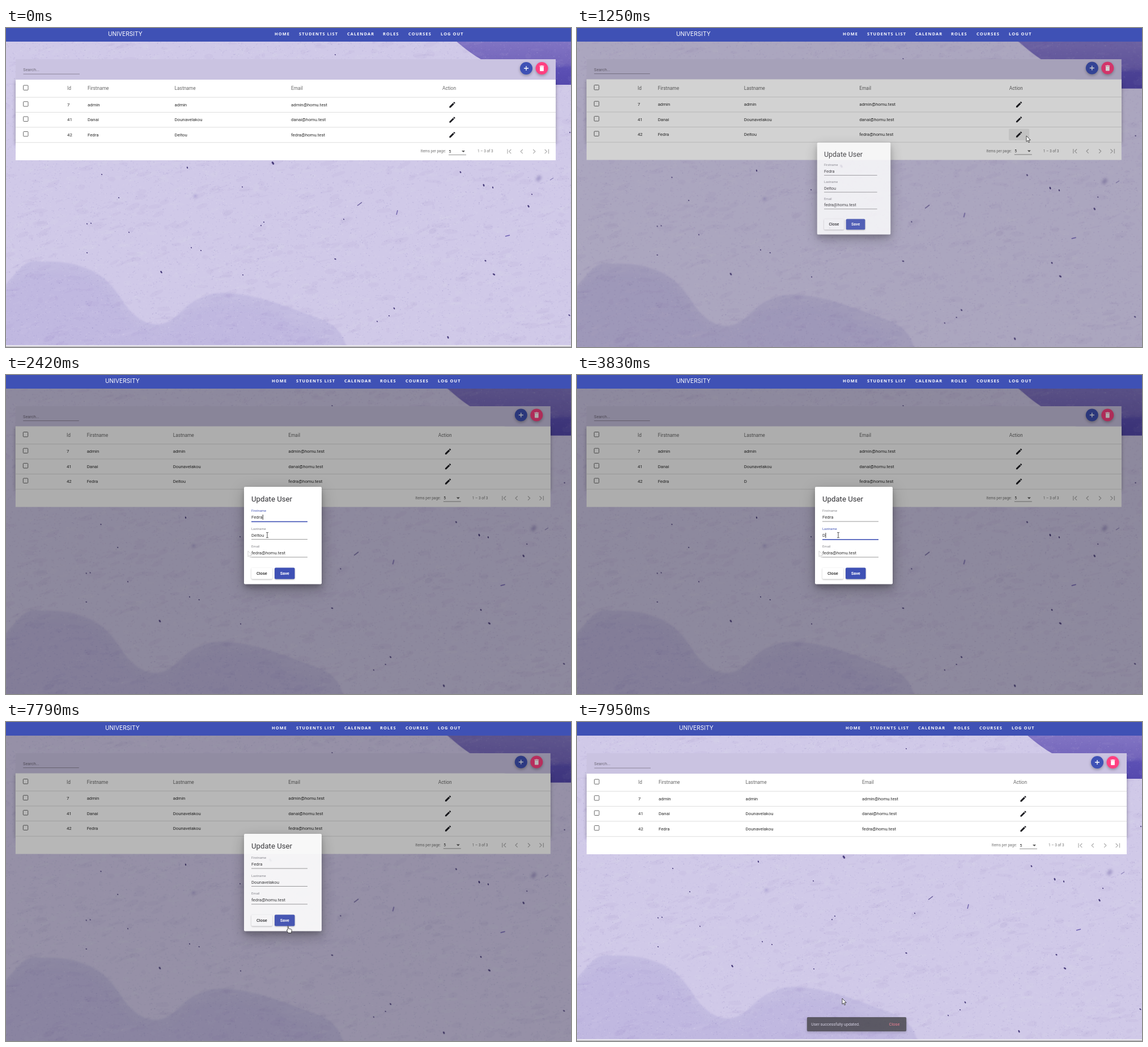
An HTML page with a canvas for the animation above (8000 ms loop, 997 by 562 pixels).

```html
<!DOCTYPE html>
<html lang="en">
<head>
<meta charset="utf-8">
<title>Update user</title>
<style>
html, body { margin: 0; width: 100%; height: 100%; overflow: hidden; background: #d0c9e6; }
canvas, svg { position: absolute; left: 0; top: 0; width: 100%; height: 100%; display: block; }
svg { overflow: hidden; }
text { font-family: Roboto, sans-serif; white-space: pre; }
.brand { font: 10.2px Inter, sans-serif; fill: #fff; }
.menu { font: 700 7.4px "Open Sans", sans-serif; letter-spacing: 1.1px; fill: #fff; }
.head { font-size: 8.4px; fill: #686868; }
.cell { font-size: 7.8px; fill: #2b2b2b; }
.hint { font-size: 7.4px; fill: #6f6a7a; }
.small { font-size: 6.5px; fill: #757575; }
.title { font-size: 13.2px; fill: #2f2f33; }
.label { font-size: 5.8px; fill: #85858a; }
.value { font-size: 7.8px; fill: #333; }
.btn { font-size: 7.4px; font-weight: 500; text-anchor: middle; }
.fab { filter: drop-shadow(0 2px 2.5px rgba(0,0,0,.3)); }
.raised { filter: drop-shadow(0 1px 1px rgba(0,0,0,.28)); }
.sheet { filter: drop-shadow(0 5px 5px rgba(0,0,0,.2)) drop-shadow(0 8px 12px rgba(0,0,0,.26)); }
.box { fill: none; stroke: #6a6a6a; stroke-width: 1; }
.arrows { fill: none; stroke: #adadad; stroke-width: 1.2; }
</style>
</head>
<body>
<canvas id="paper" width="997" height="562"></canvas>
<svg id="stage" viewBox="0 0 997 562"></svg>
<script>
const LOOP = 8000, BLUE = '#3f51b5', PINK = '#ff4081';
const KEYS = [3830, 3990, 4150, 4230, 5140, 5300, 5540, 5620, 5770, 6020, 6090, 6550];
const OLD_NAME = 'Deltou', NEW_NAME = 'Dounavelakou';
const USERS = [
  ['7', 'admin', 'admin', 'admin@homu.test'],
  ['41', 'Danai', NEW_NAME, 'danai@homu.test'],
  ['42', 'Fedra', OLD_NAME, 'fedra@homu.test'],
];

// ---- helpers ----
const clamp = (v) => Math.min(1, Math.max(0, v));
const $ = (id) => document.getElementById(id);
const set = (el, name, v) => el.setAttribute(name, v);
const show = (el, on) => set(el, 'visibility', on ? 'visible' : 'hidden');
const text = (cls, x, y, s, more = '') => `<text class="${cls}" x="${x}" y="${y}" ${more}>${s}</text>`;
const rect = (x, y, w, h, fill, more = '') =>
  `<rect x="${x}" y="${y}" width="${w}" height="${h}" fill="${fill}" ${more}/>`;

function bezier(x1, y1, x2, y2) {
  const at = (a, b, u) => 3 * a * u * (1 - u) ** 2 + 3 * b * u * u * (1 - u) + u ** 3;
  return (x) => {
    x = clamp(x);
    let lo = 0, hi = 1;
    for (let i = 0; i < 22; i++) {
      const mid = (lo + hi) / 2;
      if (at(x1, x2, mid) < x) lo = mid; else hi = mid;
    }
    return at(y1, y2, lo);
  };
}
const swift = bezier(.25, .8, .25, 1);
const decel = bezier(0, 0, .2, 1);

function random(seed) {
  return () => {
    seed = (seed * 1664525 + 1013904223) >>> 0;
    return seed / 4294967296;
  };
}

// ---- paper background ----
function makePaper() {
  const sheet = document.createElement('canvas'), W = 1012, H = 576;
  sheet.width = W;
  sheet.height = H;
  const c = sheet.getContext('2d'), rnd = random(11);
  c.fillStyle = '#d0c9e8';
  c.fillRect(0, 0, W, H);

  const blob = new Path2D('M0 452 C18 430 32 412 48 411 C84 411 110 412 132 420 C172 432 188 454 ' +
    '206 481 C224 508 245 522 267 522 C300 521 309 490 340 477 C362 466 382 464 412 469 ' +
    'C458 475 505 494 552 512 C584 522 599 544 604 576 H0Z');
  c.filter = 'blur(1px)';
  c.fillStyle = '#c3bce1';
  c.fill(blob);
  c.save();
  c.clip(blob);
  c.filter = 'blur(5px)';
  c.fillStyle = 'rgba(180,171,218,.2)';
  c.fill(new Path2D('M-10 470 C30 420 90 425 140 436 C180 448 190 490 225 520 C260 540 290 535 ' +
    '330 500 C380 478 460 488 510 520 C560 540 575 560 580 586 H-10Z'));
  c.restore();
  c.filter = 'none';

  const corner = c.createLinearGradient(0, 24, 0, 100);
  corner.addColorStop(0, '#8174c3');
  corner.addColorStop(.5, '#7466bb');
  corner.addColorStop(.62, '#5c50b4');
  corner.addColorStop(1, '#5549ae');
  c.fillStyle = corner;
  c.fill(new Path2D('M768 0 C795 24 815 42 838 55 C880 84 920 100 960 100 H1012 V0Z'));

  // fine mottling and grain
  for (let i = 0; i < 1800; i++) {
    c.fillStyle = rnd() < .5 ? 'rgba(255,255,255,.04)' : 'rgba(110,95,170,.035)';
    c.beginPath();
    c.ellipse(rnd() * W, rnd() * H, 2 + rnd() * 12, 1 + rnd() * 4, -.5 + rnd() * .6, 0, 7);
    c.fill();
  }
  for (let i = 0; i < 26000; i++) {
    const a = .03 + rnd() * .1;
    c.fillStyle = rnd() < .45 ? `rgba(255,255,255,${a * 1.2})` : `rgba(95,82,160,${a})`;
    c.fillRect(rnd() * W, rnd() * H, .8 + rnd() * 1.4, .7 + rnd() * .9);
  }
  for (let i = 0; i < 420; i++) {
    c.fillStyle = `rgba(85,72,150,${.12 + rnd() * .2})`;
    c.fillRect(rnd() * W, rnd() * H, .7 + rnd(), .7 + rnd() * .6);
  }

  // dark flecks: x, y, size
  const flecks = [471,238,4, 843,277,3, 859,281,2, 928,293,1, 922,314,3, 802,254,2, 846,410,2,
    861,434,3, 685,494,2, 676,507,1, 655,517,1, 780,545,3, 994,506,2, 581,407,2, 274,430,3,
    169,258,1, 150,344,1, 143,345,1, 143,396,1, 199,299,1, 320,246,2, 327,387,1, 581,47,1,
    455,342,1, 450,348,1, 995,184,1, 417,280,1, 217,360,1, 344,392,1, 418,435,1, 596,337,1];
  for (let i = 0; i < flecks.length; i += 3) {
    const [x, y, s] = flecks.slice(i, i + 3);
    c.fillStyle = '#4a3e7c';
    c.beginPath();
    c.ellipse(x, y, .6 + s * .6, .6 + s * .25, .3 + rnd(), 0, 7);
    c.fill();
  }
  const streak = (x, y, dx, dy, color, w) => {
    c.strokeStyle = color;
    c.lineWidth = w;
    c.beginPath();
    c.moveTo(x - dx, y - dy);
    c.lineTo(x + dx, y + dy);
    c.stroke();
  };
  streak(624, 310, 4, -3, '#6a5e9c', 1.4);
  streak(690, 325, -1, 4, '#6a5da8', 1.3);
  streak(885, 366, 4, -1, '#6f60b4', 1.8);
  streak(963, 266, 3, -2, '#8d83b8', 1.2);
  c.filter = 'blur(2px)';
  streak(940, 265, 3, -4, 'rgba(110,98,165,.45)', 7);
  streak(334, 296, 2, -2, 'rgba(120,108,180,.35)', 6);
  return sheet;
}

// ---- table page; k squeezes the columns, dy lifts the rows ----
const PENCIL = 'M3 17.25V21h3.75L17.81 9.94l-3.75-3.75L3 17.25zM20.71 7.04a1 1 0 0 0 0-1.41l-2.34-2.34' +
  'a1 1 0 0 0-1.41 0l-1.83 1.83 3.75 3.75 1.83-1.83z';
const TRASH = 'M6 19c0 1.1.9 2 2 2h8c1.1 0 2-.9 2-2V7H6v12zM19 4h-3.5l-1-1h-5l-1 1H5v2h14V4z';
const icon = (d, x, y, s, fill) =>
  `<path d="${d}" fill="${fill}" transform="translate(${x - 12 * s} ${y - 12 * s}) scale(${s})"/>`;

function page(k, dy) {
  const X = (x) => +(x * k).toFixed(2), Y = (y) => y + dy;
  const R = (x) => x - 970 + X(970); // keeps its distance to the right edge
  const left = X(17), width = X(970) - left;
  const check = (y) => `<rect class="box" x="${X(30.6)}" y="${Y(y)}" width="8.4" height="8.4" rx="1"/>`;
  let s = rect(left, Y(91), width, 111, '#fff', 'style="filter:drop-shadow(0 2px 3px rgba(0,0,0,.3))"');
  s += rect(left, 55, width, Y(91) - 55, '#cac3e1') + rect(left, Y(91), width, 142, '#fff');
  s += text('hint', X(30.3), Y(76.3), 'Search...') + rect(X(30.5), Y(80.6), X(99.5), 1, '#8d879c');
  s += `<circle class="fab" cx="${R(918)}" cy="${Y(71)}" r="11" fill="${BLUE}"/>`;
  s += `<path d="M${R(918) - 4} ${Y(71)}h8m-4-4v8" stroke="#fff" stroke-width="1.3"/>`;
  s += `<circle class="fab" cx="${R(945.5)}" cy="${Y(71)}" r="11" fill="${PINK}"/>`;
  s += icon(TRASH, R(945.5), Y(71), .56, '#fff');

  s += check(101);
  [['Id', 108], ['Firstname', 144], ['Lastname', 297.5], ['Email', 503], ['Action', 770]]
    .forEach(([t, x]) => s += text('head', X(x), Y(109.3), t));
  USERS.forEach((u, i) => {
    const y = 135 + i * 26.4;
    s += rect(left, Y(y - 13.4), width, 1, '#dedede') + check(y - 5.3);
    [108, 144, 297.5, 503].forEach((x, j) =>
      s += text('cell', X(x), Y(y + 2.7), u[j], i === 2 && j === 2 ? 'data-last' : ''));
    if (i === 2) s += rect(X(787.5) - 18, Y(178), 36, 20.4, '#000', 'rx="2" data-ripple opacity="0"');
    s += icon(PENCIL, X(787.5), Y(y + .3), .57, '#1f1f24');
  });
  s += rect(left, Y(201.2), width, 1, '#dedede');

  s += text('small', R(731.5), Y(219.3), 'Items per page:');
  s += text('small', R(781.5), Y(219.5), '5', 'style="fill:#222"');
  s += rect(R(781), Y(223), 31, .9, '#8b8b8b');
  s += `<path d="M${R(804)} ${Y(216)}h6l-3 3z" fill="#555"/>` + text('small', R(832), Y(219.3), '1 – 3 of 3');
  const chev = (x, d) => `M${R(x) - d * 1.8} ${Y(214)}l${d * 3.6} 3.6l${-d * 3.6} 3.6`;
  s += `<path class="arrows" d="${chev(889.5, -1)}${chev(910, -1)}${chev(932, 1)}${chev(952.5, 1)}` +
    `M${R(885)} ${Y(213.6)}v8M${R(957.5)} ${Y(213.6)}v8"/>`;
  return s;
}

function nav() {
  const links = [['HOME', 474], ['STUDENTS LIST', 517], ['CALENDAR', 602], ['ROLES', 665],
    ['COURSES', 710], ['LOG OUT', 767]];
  return text('brand', 180, 13.6, 'UNIVERSITY') + links.map(([t, x]) => text('menu', x, 12.6, t)).join('');
}

function dialog() {
  const field = (id, y, label, value) => text('label', 433, y, label, `id="${id}Label"`) +
    text('value', 433, y + 12, value, `id="${id}"`) + rect(433, y + 16.4, 99, .9, '#8f8f8f', `id="${id}Line"`);
  return rect(420, 197, 137, 171.5, '#fff', 'rx="2" class="sheet"') +
    text('title', 433, 223.3, 'Update User') +
    rect(433, 277, 23, 10, '#3390ff', 'id="mark"') +
    field('first', 241.2, 'Firstname', USERS[2][1]) +
    field('last', 272.7, 'Lastname', OLD_NAME) +
    field('mail', 304.1, 'Email', USERS[2][3]) +
    rect(451, 246, .9, 9, '#222', 'id="caret"') +
    rect(433, 339.5, 37, 20, '#fff', 'rx="2" class="raised"') + text('btn', 451.4, 352.1, 'Close', 'fill="#222"') +
    rect(474, 339.5, 35.5, 20, BLUE, 'rx="2" class="raised"') +
    text('btn', 491.8, 352.1, 'Save', 'fill="#fff" style="font-weight:700"');
}

const ARROW = 'M0 0V10.2L2.4 8L4 11.8L5.6 11.1L4 7.4H7.2Z';
const HAND = 'M2 0.6C3 0.2 3.6 .8 3.6 1.6V5L8 6C9 6.3 9.4 7 9.2 8L8.4 12.6H3.4L.4 8.6C-.2 7.6 .8 7 1.4 7.6L2 8Z';
const IBEAM = 'M-2 -4.6H-.6L0 -4L.6 -4.6H2M0 -4V4M-2 4.6H-.6L0 4L.6 4.6H2';

function build() {
  $('stage').innerHTML =
    `<g id="wide">${page(1, 0)}${rect(0, 558.8, 997, 3.2, '#f1f0f4')}${rect(0, 560.6, 997, 1.4, '#b4b2ba')}</g>` +
    `<g id="tight">${page(.9905, -.5)}</g>` +
    rect(0, 24, 997, 538, '#000', 'id="shade"') +
    rect(0, 0, 997, 24, BLUE) + `<g id="nav">${nav()}</g>` +
    `<g id="dialog">${dialog()}</g>` +
    `<g id="snack">${rect(400.5, 519.3, 186, 26.4, '#333', 'rx="2" style="filter:drop-shadow(0 2px 2px rgba(0,0,0,.25))"')}` +
    text('', 408.4, 535.3, 'User successfully updated.', 'font-size="7.6" fill="#dcd9e2"') +
    text('', 554, 535.2, 'Close', 'font-size="8" fill="#ff6b74"') + '</g>' +
    `<path id="trace" d="${ARROW}" transform="translate(427 310)" fill="#fff" stroke="#777" stroke-width=".7" opacity=".45"/>` +
    `<g id="cursor" stroke="#222" stroke-width=".8" stroke-linejoin="round"><path id="arrow" d="${ARROW}" fill="#fff"/>` +
    `<path id="hand" d="${HAND}" fill="#fff"/><path id="ibeam" d="${IBEAM}" fill="none"/></g>`;
}

// ---- motion ----
const PATH = [[70, 921, 518], [300, 880, 380], [520, 815, 235], [700, 790, 188], [770, 793, 190],
  [1370, 793, 190], [1700, 427, 310], [1870, 470, 294], [1960, 484, 289], [2180, 461, 282],
  [7090, 461, 282], [7420, 495, 359], [7910, 495, 359], [7950, 468, 487]];

function cursorAt(t) {
  let i = 0;
  while (i < PATH.length - 2 && t >= PATH[i + 1][0]) i++;
  const [t0, x0, y0] = PATH[i], [t1, x1, y1] = PATH[i + 1], u = clamp((t - t0) / (t1 - t0));
  return [x0 + (x1 - x0) * u, y0 + (y1 - y0) * u];
}

const cursorKind = (t) =>
  t < 680 || t >= 7950 ? 'arrow' : t < 1170 ? 'hand' : t < 1860 ? 'arrow' : t < 7200 ? 'ibeam' : t < 7320 ? 'arrow' : 'hand';

const paper = makePaper();
let layout;

function setLayout(open) {
  if (open === layout) return;
  layout = open;
  show($('wide'), !open);
  show($('tight'), open);
  set($('nav'), 'transform', `translate(${open ? -5 : 0} 0)`);
  const k = open ? .9905 : 1;
  $('paper').getContext('2d').drawImage(paper, 0, open ? 7.6 : 0, paper.width * k, paper.height * k);
}

function render(t) {
  setLayout(t >= 1170 && t < 7950);

  const typed = KEYS.filter((k) => t >= k).length;
  const name = typed ? NEW_NAME.slice(0, typed) : OLD_NAME;
  document.querySelectorAll('[data-last]').forEach((el) => el.textContent = name);
  const ripple = .03 * clamp((t - 680) / 60) + .05 * clamp((t - 1090) / 110);
  document.querySelectorAll('[data-ripple]').forEach((el) =>
    set(el, 'opacity', t > 7000 ? 0 : ripple * (1 - clamp((t - 1450) / 400))));

  set($('shade'), 'opacity', .32 * (swift((t - 1180) / 400) - swift((t - 7777) / 400)) * (t < 7950));

  // dialog
  const grow = decel((t - 1180) / 150), gone = clamp((t - 7784) / 75);
  show($('dialog'), t > 1180 && gone < 1);
  set($('dialog'), 'opacity', grow * (1 - gone));
  const s = .7 + .3 * grow;
  set($('dialog'), 'transform', `translate(488.5 282.7) scale(${s}) translate(-488.5 -282.7)`);

  const inFirst = t >= 1360 && t < 2900, inLast = t >= 2900 && t < 7500;
  const marked = t >= 3050 && t < KEYS[0];
  const focus = (id, on) => {
    $(id + 'Label').style.fill = on ? BLUE : '';
    set($(id + 'Line'), 'fill', on ? BLUE : '#8f8f8f');
    set($(id + 'Line'), 'height', on ? 1.6 : .9);
  };
  focus('first', inFirst);
  focus('last', inLast);
  $('last').textContent = name;
  $('last').style.fill = marked ? '#fff' : '';
  $('mark').style.display = marked ? '' : 'none';
  set($('mark'), 'width', $('last').getComputedTextLength());

  const since = inFirst ? 1360 : typed ? KEYS[typed - 1] : 2900;
  const blink = Math.floor((t - since) / 530) % 2 === 0;
  $('caret').style.display = (inFirst || inLast) && !marked && blink ? '' : 'none';
  set($('caret'), 'x', 433.3 + $(inFirst ? 'first' : 'last').getComputedTextLength());
  set($('caret'), 'y', inFirst ? 246 : 278);

  // snackbar
  const pop = decel((t - 7897) / 150);
  show($('snack'), t > 7897);
  set($('snack'), 'opacity', pop);
  set($('snack'), 'transform', `translate(493.5 532.5) scale(${.8 + .2 * pop}) translate(-493.5 -532.5)`);

  // pointer
  const [x, y] = cursorAt(t), kind = cursorKind(t);
  show($('trace'), t >= 1700 && t < 7090);
  set($('cursor'), 'transform', `translate(${x} ${y})`);
  for (const id of ['arrow', 'hand', 'ibeam']) show($(id), t >= 70 && id === kind);
}

build();
const start = performance.now();
function tick() {
  render((performance.now() - start) % LOOP);
  requestAnimationFrame(tick);
}
tick();
</script>
</body>
</html>
```
